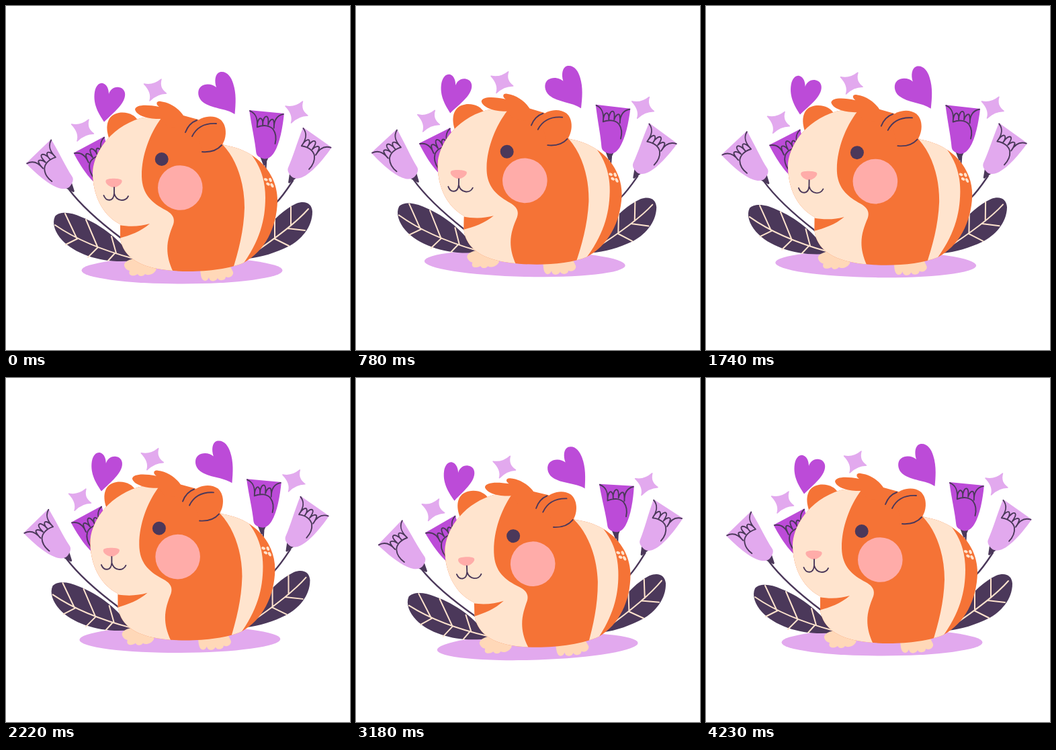
These frames come from a looping animation (512x512 px, 4.26 s). An HTML page:

```html
<!DOCTYPE html>
<html lang="en">
<head>
<meta charset="utf-8">
<title>Guinea pig in the flowers</title>
<style>
  html, body { margin: 0; width: 100%; height: 100%; overflow: hidden; background: #fff; }
  svg { display: block; width: 100vw; height: 100vh; }
  .orange { fill: #f57336; }
  .cream { fill: #ffe4ce; }
  .pink { fill: #ffaca9; }
  .foot { fill: #ffd8b8; }
  .dark { fill: #4b385a; }
  .lilac { fill: #e2a9ee; color: #e2a9ee; }
  .purple { fill: #bc4bd8; color: #bc4bd8; }
  .line { fill: none; stroke: #4b385a; stroke-width: 1.9; stroke-linecap: round; stroke-linejoin: round; }
  .stem { stroke-width: 2.4; }
  .vein { fill: none; stroke: #ffe4ce; stroke-width: 2; stroke-linecap: round; }
</style>
</head>
<body>
<svg viewBox="0 0 512 512">
  <defs>
    <g id="flower">
      <path class="dark" d="M-3 68Q3 66 9 68L5 80H3Z"/>
      <path fill="currentColor" d="M-26 0H26C26 20 24 45 17 59C13 67 8 70 3 70C-4 69-9 67-10 61C-13 45-20 25-26 0Z"/>
      <path class="line" d="M-25 1C-15 4-12 12-12 24M25 1C15 4 12 12 13 23M-12 24C-13 13-9 9-7 11Q-4 13-4 20C-5 12-2 6 1 7Q4 8 4 19C5 12 9 9 11 11Q13 15 13 23M-12 24C-2 19 7 20 12 25Q19 33 17 46"/>
    </g>
    <path id="sparkle" d="M9-16Q5-3 16.5 5Q3 5-8 16Q-4 4-16.500-9Q-3-6 9-16Z" stroke="#e2a9ee" stroke-width="1.5" stroke-linejoin="round"/>
    <path id="body" d="M200 167C230 160 280 165 325 207C375 215 404 250 404 290C403 330 385 365 354 382C320 397 255 398 220 390C190 383 173 368 170 345L170 325C145 312 130 285 129 250C129 222 152 182 200 167Z"/>
    <clipPath id="bodyClip"><use href="#body"/></clipPath>
  </defs>

  <g id="scene">
    <ellipse class="lilac" cx="262" cy="393.5" rx="149.5" ry="20"/>

    <g class="purple">
      <path d="M146 172.5C139 162 129 147 132 128C134 117 140 114 144 115C151 117 153 125 153 131C155 125 160 120 168 121C175 122 178 128 177 134C175 147 162 157 146 172.5Z"/>
      <path d="M340.5 161C327 152 306 153 293 143C285 137 284 125 290 120C298 114 308 117 313 121C310 112 311 101 318 98.5C328 96 335 105 338 115C343 130 342 145 340.5 161Z"/>
    </g>
    <g class="lilac">
      <use href="#sparkle" x="222" y="125"/>
      <use href="#sparkle" x="114" y="185"/>
      <use href="#sparkle" x="432.5" y="158"/>
    </g>

    <path class="dark" d="M190 379C150 384 105 372 83 348C73 337 68 323 73 313C79 306 95 306 112 314C142 326 172 348 190 379Z"/>
    <path class="vein" d="M73 326C102 346 145 364 190 376M88 309L105 345M119 318L136 358M157 343L164 368M89 355L107 346M122 374L137 359M152 379L162 368"/>
    <path class="dark" d="M360 376C372 352 395 312 432 294C446 289 455 294 456 306C456 330 438 349 420 358C402 367 380 374 360 376Z"/>
    <path class="vein" d="M450 302C430 325 395 350 362 372M424 299V327M400 312V346M445 334L419 331M421 357L399 346"/>

    <path class="line stem" d="M93 272C110 295 140 322 172 346M387 232L386 246M427 260C419 272 412 283 402 293"/>
    <use class="purple" href="#flower" transform="translate(123.5 206.5) rotate(-28) scale(-1 1)"/>
    <use class="lilac" href="#flower" transform="translate(48.5 216.2) rotate(-44) scale(-1 1)"/>
    <use class="purple" href="#flower" transform="translate(388 157.5) rotate(5.5)"/>
    <use class="lilac" href="#flower" transform="translate(463.5 195.5) rotate(35)"/>

    <path class="orange" d="M153 196C147 178 151 162 168 159C182 157 192 163 196 170L175 195Z"/>
    <path class="foot" d="M177 389C173 383 180 378 190 376L215 384C222 388 226 391 222 395C219 399 212 402 207 399C204 403 198 403 196 399C190 403 181 402 184 394Q179 393 177 389Z"/>
    <path class="foot" d="M289 392C290 400 290 408 296 409Q300 409 302 404C303 411 312 411 315 405C317 410 327 409 327 403C333 406 339 401 338 396L334 388Z"/>

    <use class="orange" href="#body"/>
    <g clip-path="url(#bodyClip)">
      <path class="cream" d="M231 167C214 190 202 222 202 252C202 280 217 293 238 304C247 309 252 315 249 325C241 345 234 365 249 396L120 400V150H231Z"/>
      <path class="orange" d="M168 326C185 329 200 328 214 324C200 336 185 341 168 346Z"/>
      <path class="cream" d="M317 201C343 224 355 263 355 300C354 335 346 365 337 394L350 388C378 350 386 318 386 285C386 258 378 235 360 215Z"/>
    </g>
    <g class="cream">
      <ellipse cx="386.8" cy="258.3" rx="3" ry="2" transform="rotate(25 386.8 258.3)"/>
      <ellipse cx="393.5" cy="258.8" rx="2" ry="3.2" transform="rotate(-25 393.5 258.8)"/>
      <ellipse cx="390" cy="265" rx="3" ry="2" transform="rotate(30 390 265)"/>
      <ellipse cx="396" cy="267" rx="2" ry="3.6" transform="rotate(-30 396 267)"/>
    </g>

    <path class="orange" d="M192 154C193 147 208 146 228 150C222 146 224 141 230 142C246 144 258 154 264 163L286 169L300 185L240 180L231 168C212 169 194 163 192 154Z"/>
    <path class="orange" d="M280 175C290 164 308 161 319 169C329 177 329 195 322 206C315 215 303 218 292 217Z"/>
    <path class="line" d="M267 188C270 180 276 173 284 170M277 194C284 180 296 174 313 175M292 217C304 218 314 215 321 207"/>

    <circle class="pink" cx="259.3" cy="270.5" r="33.3"/>
    <circle class="dark" cx="231.7" cy="228" r="10"/>
    <path class="pink" d="M149 259C152 256 168 256 172 259C175 263 166 270 161 270C155 270 146 264 149 259Z"/>
    <path class="line" d="M161 270V279M145.5 282C149 291 160 292 161 279C164 291 178 292 182 283"/>
  </g>
</svg>
<script>
  const LOOP = 4260, STEP = 30;
  const PIVOT = "260 308";
  // Sway poses: time in ms, shift x, shift y, angle in degrees
  const poses = [
    [0, 0, 0, 0],
    [780, -8.8, -10.6, 1.28],
    [1140, -13, -14.8, 1.82],
    [1740, -8, -9.4, 0.85],
    [2700, 1, 0.6, -1.3],
    [3500, 8, 9.8, -2.45],
    [3630, 8.2, 8.7, -2.5],
    [4230, 0, 0, 0],
    [LOOP, 0, 0, 0]
  ];
  const scene = document.getElementById("scene");

  function poseAt(time) {
    const next = poses.findIndex(pose => pose[0] > time);
    const from = poses[next - 1], to = poses[next];
    const k = (time - from[0]) / (to[0] - from[0]);
    return from.map((value, i) => value + (to[i] - value) * k);
  }

  function draw(time) {
    const [, x, y, angle] = poseAt(Math.floor((time % LOOP) / STEP) * STEP);
    scene.setAttribute("transform", `translate(${x} ${y}) rotate(${angle} ${PIVOT})`);
  }

  const start = performance.now();
  function tick() {
    draw(performance.now() - start);
    requestAnimationFrame(tick);
  }
  tick();
</script>
</body>
</html>
```
